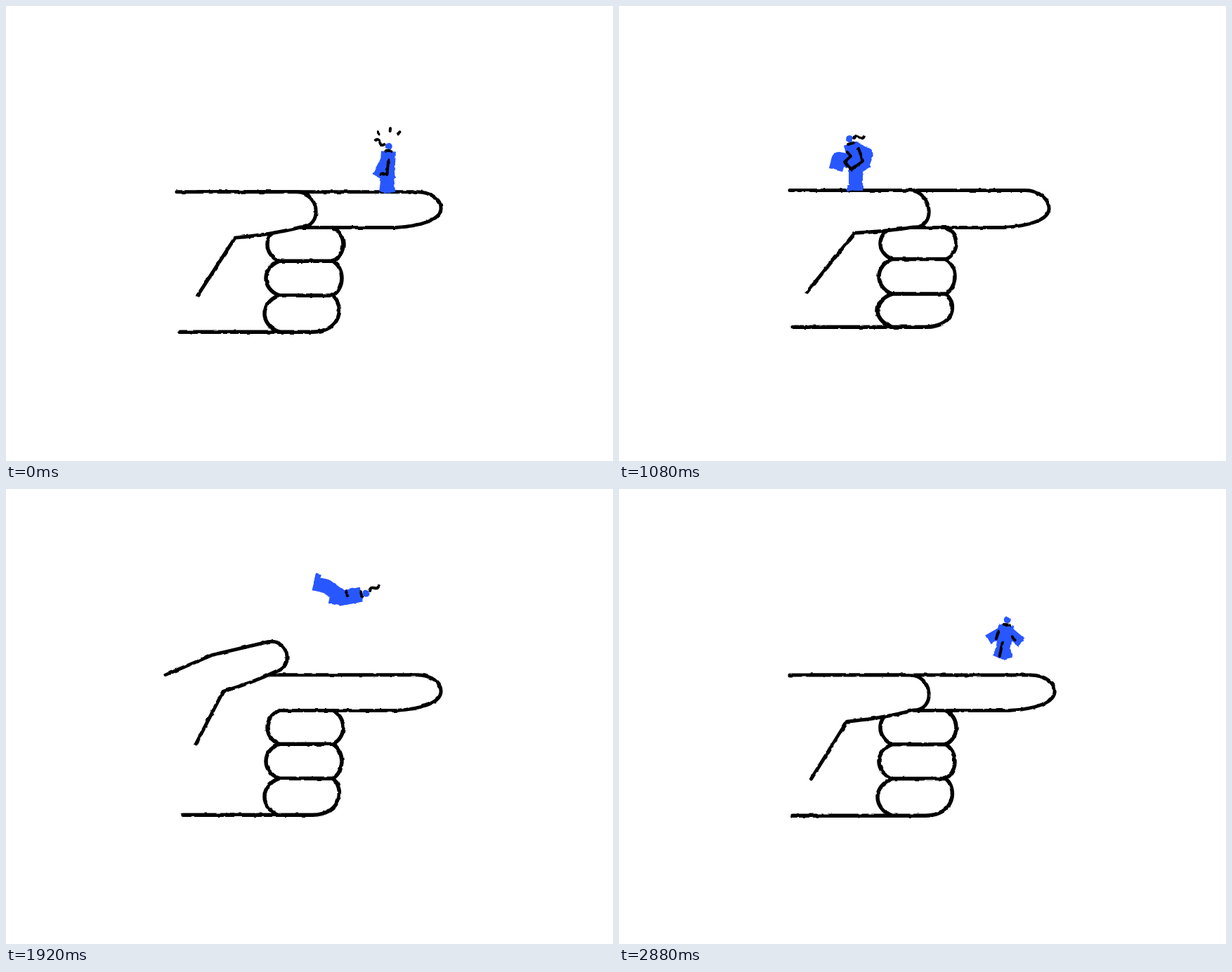
An HTML page for the animation above (3 s loop, 864 by 648 pixels).

```html
<!DOCTYPE html>
<html lang="en">
<head>
<meta charset="utf-8">
<title>Finger jump</title>
<style>
html, body { margin: 0; height: 100%; overflow: hidden; background: #fff; }
svg { display: block; width: 100%; height: 100%; }
path { fill: none; stroke: #000; stroke-linecap: round; stroke-linejoin: round; }
#hand { stroke-width: 5; }
#fist { stroke-width: 5.5; }
#thumb { fill: #fff; }
#man path { stroke: #2957ff; stroke-linecap: butt; }
#man circle { fill: #2957ff; }
#ink { stroke-width: 4; }
</style>
</head>
<body>
<svg viewBox="0 0 864 648">
  <filter id="rough" filterUnits="userSpaceOnUse" width="864" height="648" color-interpolation-filters="sRGB">
    <feTurbulence id="noise" type="fractalNoise" baseFrequency=".1" numOctaves="2"/>
    <feDisplacementMap in="SourceGraphic" scale="3" xChannelSelector="R" yChannelSelector="G"/>
  </filter>
  <g filter="url(#rough)">
    <g id="hand"><path id="fist"/><path id="index"/><path id="thumb"/></g>
    <g id="man">
      <path id="limbs"/><path id="torso" stroke-width="21"/><path id="toe" stroke-width="8"/><circle id="head" r="5"/>
    </g>
    <g id="ink"><path id="collar"/><path id="sleeve"/><path id="hair" d="M7 0q3-5 7 0t7 0"/><path id="sparks"/></g>
  </g>
</svg>
<script>
const STEP = 120, STEPS = 25;

// Angles in degrees, clockwise from the right; x and y place the hip.
const poses = [
  { at: 0, x: 543, y: 234, spine: -87, arms: [85, 118], legs: [84, 97], bends: [0, 0],
    limb: 32, width: 16, hair: 205, lift: 15, sleeve: 'M0 12L-2 32L-11 33' },
  { at: 5, x: 438, y: 203, spine: -62, arms: [-2, 195], legs: [22, 182], bends: [0, -100],
    limb: 48, width: 19, hair: 345, lift: 10, sleeve: 'M3 19Q0 29-11 29' },
  { at: 9, x: 337, y: 222, spine: -105, arms: [60, 25], legs: [90, 190], bends: [0, -85],
    limb: 41, width: 20, hair: 350, lift: 0, sleeve: 'M11 7l6 18l-16 12l-10-11l9-8l-5-6' },
  { at: 11, x: 255, y: 209, spine: -94, arms: [176, 176], legs: [133, 133], bends: [0, 0],
    limb: 48, width: 20, hair: 205, lift: 25, sleeve: 'M-3 22l4-2' },
  { at: 14, x: 434, y: 120, spine: -18, arms: [250, 250], legs: [163, 163], bends: [0, 0],
    limb: 52, width: 20, hair: 270, lift: 20, sleeve: 'M-22-5l2 6' },
  { at: 19, x: 547, y: 256, spine: 0, arms: [45, 45], legs: [295, 295], bends: [-58, -58],
    limb: 40, width: 20, hair: 410, lift: 0, sleeve: 'M-16 5l3 6' },
  { at: 24, x: 548, y: 220, spine: -82, arms: [40, 150], legs: [78, 115], bends: [0, 0],
    limb: 22, width: 15, hair: 410, lift: 0, sleeve: 'M-11 9l-4 11M-6 25l-4 20M8 17l3 5' }
];

// start, outer knuckle, tip start, tip, tip end, inner curve, inner knuckle, end
const straightThumb = [[197, 275], [201, 160], [203, 142], [229, 104], [255, 150], [256, 175], [257, 200], [258, 260]];
const bentThumb = [[198, 264], [220, 180], [290, 124], [316, 123], [313, 150], [296, 176], [275, 205], [266, 264]];
const foldedThumb = (top, sway) => [
  [243, top], [330, top], [414, top], [441, 290], [419, 315],
  [380, 324 + 3 * sway], [329 - 7 * sway, 328 + 5 * sway], [271 + 4 * sway, 411 + 3 * sway]
];

const $ = id => document.getElementById(id);
const set = (id, attributes) => Object.entries(attributes).forEach(([name, value]) => $(id).setAttribute(name, value));
const line = (...points) => 'M' + points.join('L');
const polar = ([x, y], degrees, length) => {
  const a = degrees * Math.PI / 180;
  return [x + length * Math.cos(a), y + length * Math.sin(a)];
};

// Blends numbers, arrays and objects alike; strings come from the nearer side.
function mix(a, b, u) {
  if (typeof a === 'number') return a + (b - a) * u;
  if (typeof a === 'string') return u < .5 ? a : b;
  if (Array.isArray(a)) return a.map((v, i) => mix(v, b[i], u));
  return Object.fromEntries(Object.keys(a).map(name => [name, mix(a[name], b[name], u)]));
}

function progress(keys, step) {
  const k = keys.findLastIndex(key => key.at <= step);
  const next = Math.min(k + 1, keys.length - 1);
  return [keys[k], keys[next], next === k ? 0 : (step - keys[k].at) / (keys[next].at - keys[k].at)];
}

function drawHand(step) {
  const sway = -Math.cos((step - 8) / STEPS * 2 * Math.PI);
  const top = 264 + 1.5 * sway;
  const folded = foldedThumb(top, sway);
  const thumb = mix(...progress([
    { at: 0, points: folded }, { at: 9, points: folded },
    { at: 10, points: straightThumb }, { at: 11, points: straightThumb },
    { at: 14, points: bentThumb }, { at: 17, points: folded }
  ], step)).points;

  const [start, outer, tipIn, tip, tipOut, curve, inner, end] = thumb;
  const push = tip.map((v, i) => (v - (tipIn[i] + tipOut[i]) / 2) * 4 / 3);
  const shift = p => p.map((v, i) => v + push[i]);
  set('thumb', { d: `${line(start, outer, tipIn)}C${shift(tipIn)} ${shift(tipOut)} ${tipOut}Q${curve} ${inner}L${end}` });

  const creases = [315.5, 362.5 + 2 * sway, 411.5 + 1.5 * sway, 462 + 5 * sway];
  const [bottom, , last, floor] = creases;
  const bulge = (x, y0, y1, edge) => {
    const c = (4 * edge - x) / 3, dy = (y1 - y0) * .2;
    return `M${x} ${y0}C${c} ${y0 + dy} ${c} ${y1 - dy} ${x} ${y1}`;
  };
  let fist = '';
  for (let i = 0; i < 3; i++) {
    fist += bulge(389, creases[i], creases[i + 1], 372 - 2 * i);
    if (i < 2) fist += bulge(465, creases[i], creases[i + 1], 480 - 2 * i) + `M389 ${creases[i + 1]}H465`;
  }
  const wrist = 247 + (412 - end[1]) / 12;
  set('fist', { d: `${fist}M465 ${last}C482 ${last + 14} 478 ${floor} 436 ${floor}H${wrist}` });

  const tipX = 617 + 5 * sway;
  set('index', { d: `M${Math.max(258, end[0])} ${top}H${tipX - 34}` +
    `C${tipX - 14} ${top} ${tipX} 276 ${tipX} 288C${tipX} 304 ${tipX - 27} ${bottom - 2} ${tipX - 65} ${bottom}H392` });
}

function drawMan(step) {
  const [from, to, u] = progress(poses, step);
  const { x, y, spine, arms, legs, bends, limb, width, hair, sleeve } = mix(from, to, u);
  const hip = [x, y - from.lift * 4 * u * (1 - u)];
  const shoulder = polar(hip, spine, 20), neck = polar(hip, spine, 27), head = polar(hip, spine, 34);
  const jointed = (origin, angle, bend, length) => {
    const joint = polar(origin, angle, length * .6);
    return [origin, joint, polar(joint, angle + bend, length * .4)];
  };

  let limbs = '';
  for (const i of [0, 1]) {
    limbs += line(...jointed(hip, legs[i], bends[i], limb)) +
      line(...jointed(shoulder, arms[i], -bends[i], 20 + limb * .4));
  }
  const shin = legs[0] + bends[0];
  const ankle = polar(jointed(hip, legs[0], bends[0], limb)[2], shin, -4);
  set('limbs', { d: limbs, 'stroke-width': width });
  set('torso', { d: line(polar(hip, spine, -5), neck) });
  set('toe', { d: line(ankle, polar(ankle, shin + 90, width / 2 + (limb - 30) / 4)) });
  set('head', { cx: head[0], cy: head[1] });

  set('collar', { d: line(polar(neck, spine - 90, 4), polar(neck, spine + 90, 4)) });
  set('sleeve', { d: sleeve, transform: `translate(${neck})` });
  set('hair', { transform: `translate(${head}) rotate(${hair})`, visibility: limb > 28 ? 'visible' : 'hidden' });
  const rays = step < 2 ? [-127, -85, -53] : [];
  set('sparks', { d: rays.map(a => line(polar(head, a, 22), polar(head, a, 26))).join('') });
}

let shown = -1;
function frame(now) {
  const step = Math.floor(now / STEP) % STEPS;
  if (step !== shown) {
    shown = step;
    drawHand(step);
    drawMan(step);
    set('noise', { seed: step + 1 });
  }
  requestAnimationFrame(frame);
}
requestAnimationFrame(frame);
</script>
</body>
</html>
```
